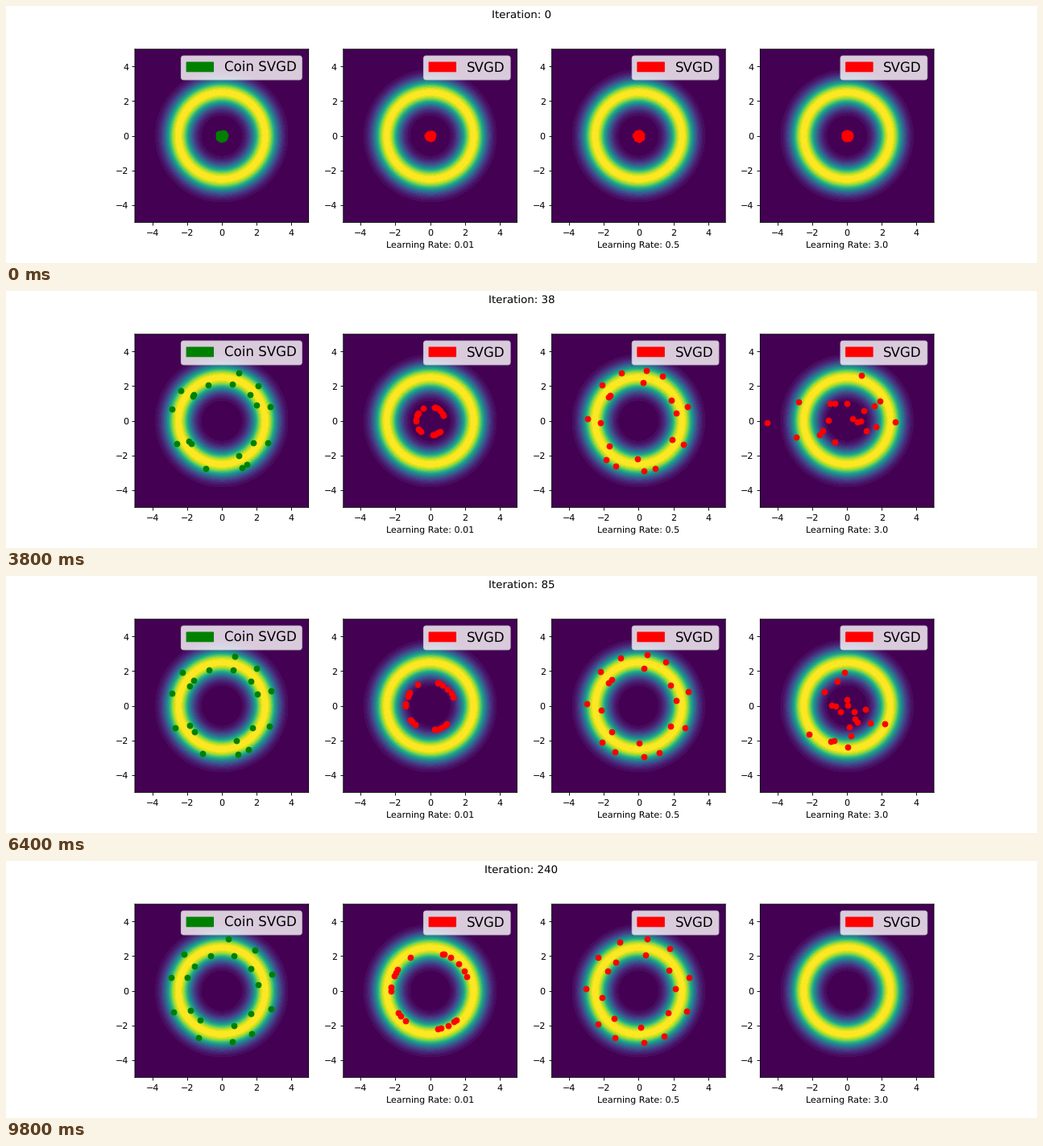
A matplotlib script for the animation above (10 s loop, 1280 by 320 pixels).

```python
import numpy as np
import matplotlib.pyplot as plt
from matplotlib.animation import FuncAnimation
from matplotlib.patches import Patch

# Soft, unsnapped edges and unhinted text
plt.rcParams.update({"font.family": "DejaVu Sans", "path.snap": False,
                     "text.hinting": "none"})

RADIUS = 2.5
COUNT = 20
BANDS = 31
ITERATIONS = [*range(0, 50, 2), *range(50, 100, 5), *range(100, 241, 10)]


def polar(deg, r):
    a = np.radians(deg)
    return np.column_stack([r * np.cos(a), r * np.sin(a)])


def even_out(deg, it):
    """Angles of one ring, drifting towards equal spacing in logarithmic time."""
    deg = np.array(deg)
    slots = 360 / len(deg) * np.arange(len(deg))
    even = slots + np.mean(deg - slots)
    return deg + (even - deg) * 0.35 * np.log((1 + it) / 66)


def staggered(inner, outer, power):
    """Particles burst out of the centre, then settle on two rings."""
    def pose(it):
        burst = 1 - (1 - min(it / 12, 1)) ** power
        scale = 0.065 + 0.935 * burst
        late = max(it, 12)
        gap = 0.3 + 0.05 * np.log(late / 12)
        return scale * np.vstack([polar(even_out(inner, late), RADIUS + 0.07 - gap),
                                  polar(even_out(outer, late), RADIUS + 0.07 + gap)])
    return pose


def creeping(deg):
    """Every particle moves straight out and slows down near the ring."""
    def pose(it):
        return polar(deg, 0.15 + 2.4 * (1 - np.exp(-it / 115)))
    return pose


def erratic(it):
    """Steps far too large: scattered anew each time, then diverged."""
    if it > 100:
        return np.empty((0, 2))
    if it == 0:
        return polar(np.arange(COUNT) * 137.5, 0.17)
    spread = 1 + 2 * np.exp(-it / 10)
    return np.random.default_rng(it).standard_t(5, (COUNT, 2)) * spread


PANELS = [
    ("Coin SVGD", "green", "", staggered(
        [20, 41, 73, 110, 137, 145, 212, 222, 294, 324],
        [17, 46, 74, 141, 166, 206, 249, 290, 301, 336], 4)),
    ("SVGD", "red", "Learning Rate: 0.01", creeping(
        [21, 30, 44, 59, 69, 71, 120, 147, 152, 158,
         175, 180, 215, 221, 231, 281, 286, 297, 307, 312])),
    ("SVGD", "red", "Learning Rate: 0.5", staggered(
        [9, 33, 82, 138, 141, 185, 223, 270, 328],
        [16, 60, 81, 110, 137, 178, 227, 243, 276, 292, 334], 2)),
    ("SVGD", "red", "Learning Rate: 3.0", erratic),
]

fig, axes = plt.subplots(1, 4, figsize=(16, 4), dpi=80)
title = fig.suptitle("Iteration: 0", fontsize=12)

grid = np.linspace(-5, 5, 160)
gx, gy = np.meshgrid(grid, grid)
density = np.exp(-(np.hypot(gx, gy) - RADIUS) ** 2 / 0.5)
levels = np.linspace(0, 1, BANDS + 1)
half = 0.5 / BANDS   # lowest and highest band take the ends of the colour map

dots = []
for ax, (name, color, label, pose) in zip(axes, PANELS):
    ax.contourf(gx, gy, density, levels=levels, cmap="viridis", vmin=half, vmax=1 - half)
    dots.append(ax.scatter(*pose(0).T, color=color))
    ax.set(xlim=(-5, 5), ylim=(-5, 5), aspect="equal", xlabel=label,
           xticks=range(-4, 5, 2), yticks=range(-4, 5, 2))
    ax.legend(handles=[Patch(color=color, label=name)], loc="upper right", fontsize=15)


def update(i):
    it = ITERATIONS[i]
    title.set_text(f"Iteration: {it}")
    for dot, (*_, pose) in zip(dots, PANELS):
        dot.set_offsets(pose(it))
    return [title, *dots]


anim = FuncAnimation(fig, update, frames=len(ITERATIONS), interval=200,
                     repeat=True, repeat_delay=0, blit=False)
plt.show()
```
